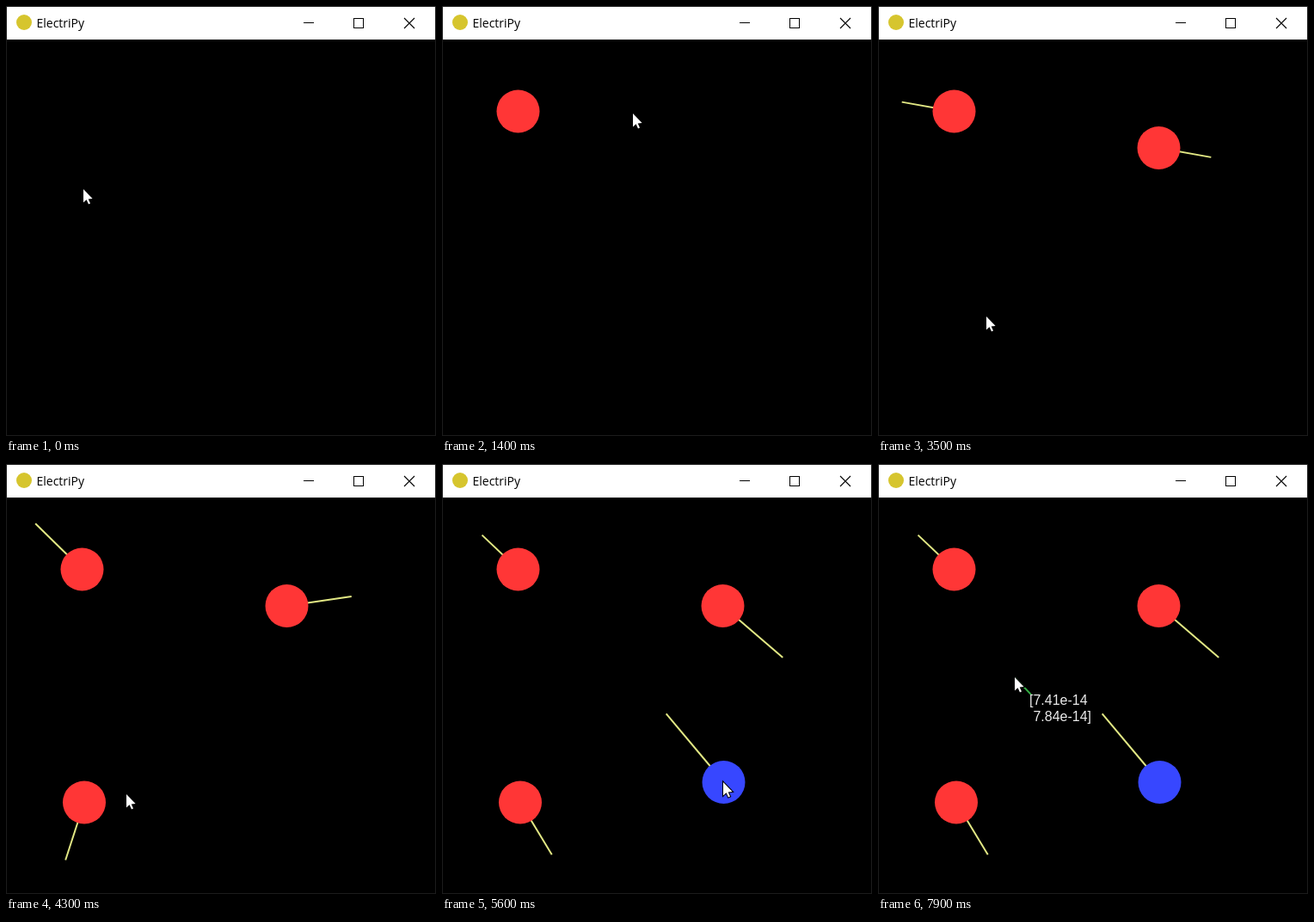
Recreate the animation shown at these times as an HTML page with a canvas. Size 500 px wide and 500 px high, loop 8 s.

```html
<!DOCTYPE html>
<html lang="en">
<head>
<meta charset="utf-8">
<title>ElectriPy</title>
<style>
html, body { margin: 0; width: 100%; height: 100%; overflow: hidden; background: #000; }
canvas { display: block; }
</style>
</head>
<body>
<canvas id="stage" width="500" height="500"></canvas>
<script>
const ctx = document.getElementById('stage').getContext('2d');
const LOOP = 8000, STEP = 100, FIELD_ON = 7400;
const RADIUS = 25;
const FORCE_SCALE = 2.15e6;   // pixels of line per unit of force
const FIELD_SCALE = 2.261e-9; // displayed field per unit
const HOTSPOT = 2.05;         // field is sampled just above the pointer tip

const charges = [
  { x: 88.5, y: 122.5, q: 1, at: 500 },
  { x: 326.5, y: 165, q: 1, at: 2200 },
  { x: 91, y: 393.5, q: 1, at: 3700 },
  { x: 327.5, y: 370, q: -1, at: 5500 }
];

// Pointer key points: time, x, y
const path = [
  [0, 90, 213], [500, 88, 123], [700, 88, 123], [1400, 222, 125],
  [2000, 326, 165], [2100, 326, 165], [2500, 301, 198], [3700, 91, 393],
  [4000, 91, 393], [4300, 140, 384], [4900, 285, 384], [5200, 301, 367],
  [5500, 327, 370], [5600, 327, 370], [5900, 313, 350], [6700, 274, 345],
  [7900, 159, 248]
];

const arrow = new Path2D('M0 0V15.5L3.6 12.2L6 17.5L8 16.6L5.7 11.4L10.6 11Z');

function pointerAt(t) {
  const i = Math.max(1, path.findIndex(p => p[0] >= t));
  const [t0, x0, y0] = path[i - 1], [t1, x1, y1] = path[i];
  const u = (t - t0) / (t1 - t0);
  return [Math.round(x0 + (x1 - x0) * u), Math.round(y0 + (y1 - y0) * u)];
}

// Coulomb field at a point, with constants left out
function fieldAt(x, y, sources) {
  let ex = 0, ey = 0;
  for (const c of sources) {
    const dx = x - c.x, dy = y - c.y, s = c.q / Math.hypot(dx, dy) ** 3;
    ex += s * dx;
    ey += s * dy;
  }
  return [ex, ey];
}

function line(x0, y0, x1, y1, color, width) {
  ctx.strokeStyle = color;
  ctx.lineWidth = width;
  ctx.beginPath();
  ctx.moveTo(x0, y0);
  ctx.lineTo(x1, y1);
  ctx.stroke();
}

function vector(x, y, dx, dy, length, color) {
  const s = length / Math.hypot(dx, dy);
  line(x, y, x + dx * s, y + dy * s, color, 2);
}

function disc(x, y, r, color) {
  ctx.fillStyle = color;
  ctx.beginPath();
  ctx.arc(x, y, r, 0, Math.PI * 2);
  ctx.fill();
}

function text(str, x, y, font, color) {
  ctx.font = font;
  ctx.fillStyle = color;
  ctx.fillText(str, x, y);
}

function drawWindow() {
  ctx.fillStyle = '#000';
  ctx.fillRect(0, 0, 500, 500);
  ctx.strokeStyle = '#1c1c1c';
  ctx.lineWidth = 1;
  ctx.strokeRect(0.5, 0.5, 499, 499);
  ctx.fillStyle = '#fff';
  ctx.fillRect(1, 1, 498, 38);
  disc(21, 19, 9, '#d6c52e');
  text('ElectriPy', 35.5, 25, '14px "Open Sans", sans-serif', '#000');
  line(346, 19.5, 358, 19.5, '#000', 1);
  ctx.strokeRect(404.5, 14.5, 11, 11);
  line(463, 14, 475, 26, '#000', 1.1);
  line(475, 14, 463, 26, '#000', 1.1);
}

function drawCharges(t) {
  const shown = charges.filter(c => t >= c.at);
  if (shown.length > 1) {
    for (const c of shown) {
      const [ex, ey] = fieldAt(c.x, c.y, shown.filter(o => o !== c));
      const length = RADIUS + FORCE_SCALE * Math.hypot(ex, ey);
      vector(c.x, c.y, ex * c.q, ey * c.q, length, '#e2e884');
    }
  }
  for (const c of shown) disc(c.x, c.y, RADIUS, c.q > 0 ? '#ff3636' : '#3747ff');
}

function drawField(x, y) {
  const [ex, ey] = fieldAt(x, y - HOTSPOT, charges);
  const label = v => (v * FIELD_SCALE).toExponential(2);
  const font = '16px "Liberation Sans", Arial, sans-serif';
  vector(x, y, ex, ey, 28, '#35b045');
  text('[' + label(ex), x + 17, y + 32, font, '#ebebeb');
  text(' ' + label(ey) + ']', x + 17, y + 51, font, '#ebebeb');
}

function drawPointer(x, y) {
  ctx.save();
  ctx.translate(x, y);
  ctx.strokeStyle = '#000';
  ctx.lineWidth = 2;
  ctx.stroke(arrow);
  ctx.fillStyle = '#fff';
  ctx.fill(arrow);
  ctx.restore();
}

function frame(now) {
  const t = Math.floor(now % LOOP / STEP) * STEP;
  const [x, y] = pointerAt(t);
  drawWindow();
  drawCharges(t);
  if (t >= FIELD_ON) drawField(x, y);
  drawPointer(x, y);
  requestAnimationFrame(frame);
}
requestAnimationFrame(frame);
</script>
</body>
</html>
```
